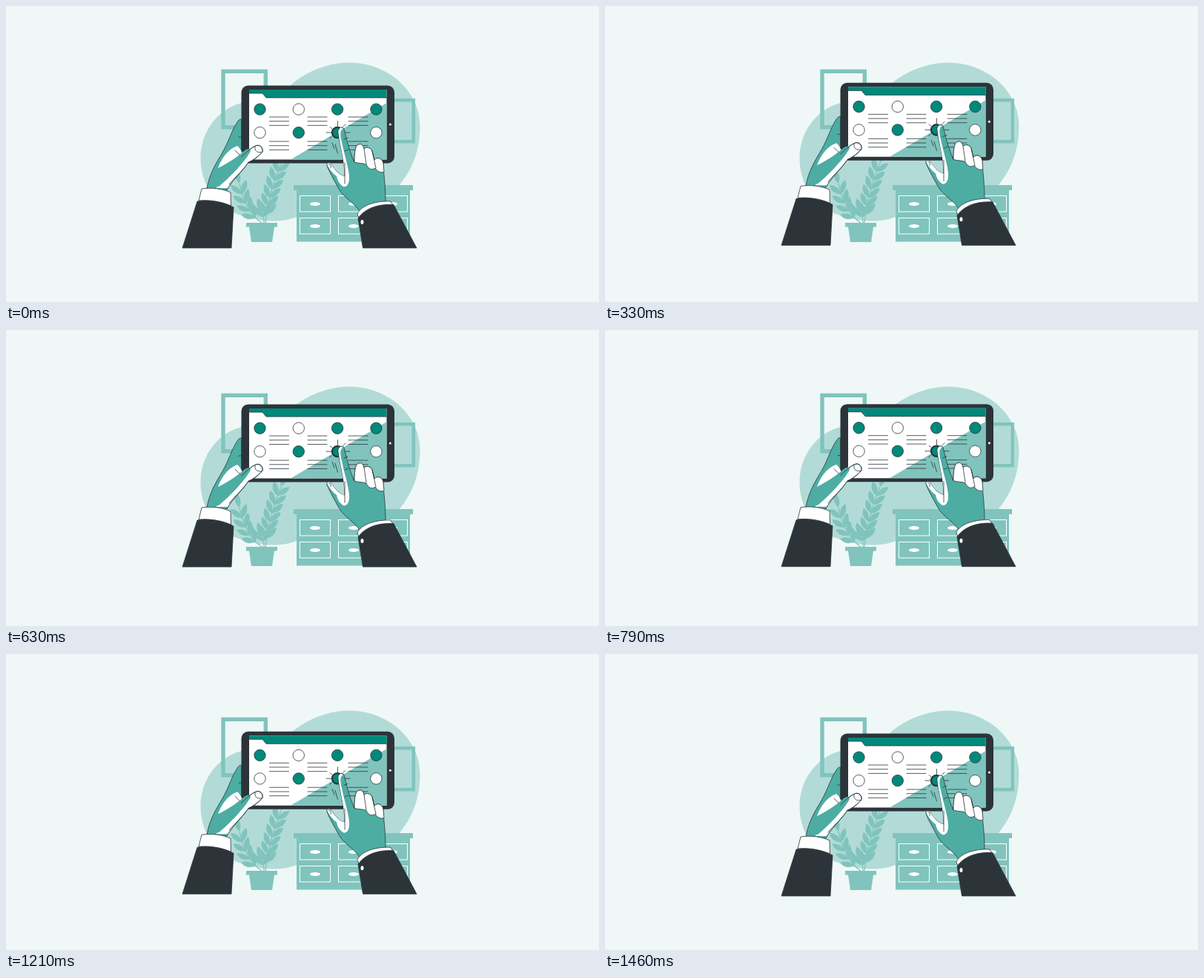
An HTML page that plays this animation: 800x400 px, repeating every 1.5 s.

```html
<!DOCTYPE html>
<html lang="en">
<head>
<meta charset="utf-8">
<title>Tablet in hands</title>
<style>
  html, body { margin: 0; width: 100%; height: 100%; overflow: hidden; background: #eff8f7; }
  svg { display: block; width: 100%; height: 100%; }
  .line { fill: none; stroke: #2c343a; stroke-width: .8; stroke-linecap: round; stroke-linejoin: round; }
  .ink { stroke: #2c343a; stroke-width: .8; stroke-linejoin: round; }
  .dark { fill: #2c343a; }
  .teal { fill: #00897b; }
  .skin { fill: #4dada3; }
  .mid { fill: #80c4bd; }
  .white { fill: #fff; }
  .stem { fill: none; stroke: #80c4bd; stroke-width: 1.3; }
  .drawer { fill: none; stroke: #fff; stroke-width: 1; }
</style>
</head>
<body>
<svg viewBox="0 0 800 400">
  <path fill="#b2dbd7" d="M462 76.5C515 76 558.500 115 558.500 162C558.500 200 545 225 530 243V270L392 285C373 293 345 292 322 284.500C285 275 262.500 243 262.500 206C262.500 165 291 137 318 131C350 124 370 118 384 107C400 92 430 77 462 76.5Z"/>
  <g fill="none" stroke="#80c4bd">
    <rect x="293" y="88.300" width="57.3" height="75.500" stroke-width="5.400"/>
    <rect x="490" y="127.2" width="59.8" height="56" stroke-width="4.5"/>
  </g>
  <g id="plant"><path class="mid" d="M324 293H366V298.5H362L359 319H331L328 298.5H324Z"/></g>
  <g id="desk"><path class="mid" d="M388 242H549V249H545V318.5H392V249H388Z"/></g>

  <g id="front">
    <rect class="dark" x="317.5" y="107.5" width="206.5" height="105" rx="9"/>
    <path class="white" d="M328 113H513.5V207.5H328Z"/>
    <path class="mid" d="M384 207.5L513.5 131V207.5Z"/>
    <path class="teal" d="M328 113H513.5V124H351L346 118H328Z"/>
    <path class="line" d="M328 118H346L351 124H513.5"/>
    <circle class="white" cx="518.4" cy="160" r="1.5"/>
    <g id="screen"></g>
    <circle class="teal" cx="447" cy="171" r="7" stroke="#2c343a" stroke-width="2"/>
    <path class="line" d="M447.5 155.5V163M432 171H439M456 171H464M437 163.5L440 166M455 163L458 160M440 185L443 193M444 187L447.5 199M439 177L436.5 179"/>

    <!-- left arm -->
    <path class="skin ink" d="M271 247C274 228 283 213 292 198C301 182 305 167 312 157C314 153.5 316 152.5 317.5 153V204C325 197 331 191 338 188.5C343 187 347 192 346 197C340 204 333 209 327 211C319 224 306 234 298 249Z"/>
    <path class="white" d="M286 219C290 208 298 194 312 189C316 192 318 197 320 201.5C327 196 332 191 338 189C343 188 346 192 345.5 197C339 204 333 208 327 211C319 222 306 234 299 246L284 246Z"/>
    <path class="skin" d="M272 247C276 232 280 224 286 219C298 213 311 205 321 196C327 191 332 193 329 198C322 210 305 229 287 244Z"/>
    <path class="line" d="M336 190C335 196 339 199 345 197.5M309 195L315 201M314 177H317.5M317.5 204C325 197 331 191 338 188.5C343 187 347 192 346 197C340 204 333 209 327 211C319 224 308 232 301 241"/>
    <path class="white ink" d="M260 263L264 247C277 245 293 247 303 252L303.5 270C290 264 275 262 260 263Z"/>
    <path class="dark ink" d="M258 264C273 261 293 265 307 272L304 327H238Z"/>

    <!-- right arm -->
    <path class="skin ink" d="M448 171C447 164 454 162 456 166C459 178 463 196 470 211C470 200 471 190 474 188C478 185 482 187 483 193C486 190 492 191 494 196L497 208C501 203 508 206 509 213C509 225 512 238 512 267L478 279C472 267 456 260 449 247C443 236 437 226 433 216C432 211 437 210 440 216C446 225 453 230 457 230C457 209 450 187 448 171Z"/>
    <path class="white" d="M433.5 215C433 211 437 211 440 216C446 225 453 230 457 230C457 209 450 187 448.5 171C448 166 452 163 455 166C450 167 451 176 453 184C457 203 462 217 463 230C464 240 459 246 455 244C449 240 447 235 446 230C442 227 437 222 433.5 215Z"/>
    <path class="white ink" d="M470 211C470 200 471 190 474 188C478 185 482 187 483 193C486 190 492 191 494 196L497 208C501 203 508 206 509 213L510 224C506 226 501 224 498 219C494 222 489 221 486 214C481 212 475 213 470 211Z"/>
    <path class="line" d="M483 193L486 213M494 196L499 219M456 180L461 178M457 196L462 193.5M457 212V240M435 213C438 214 439 217 438 219"/>
    <path class="white ink" d="M474 281C479 269 500 263 519 264L522 269C503 268 486 275 477 289Z"/>
    <path class="dark ink" d="M475 287C483 275 499 267 523 268.5L554 327H481.5Z"/>
    <ellipse class="white" cx="480.5" cy="292" rx="2" ry="3"/>
  </g>
</svg>
<script>
const byId = id => document.getElementById(id);

function add(parent, tag, attrs) {
  const node = document.createElementNS(parent.namespaceURI, tag);
  for (const key in attrs) node.setAttribute(key, attrs[key]);
  parent.append(node);
}

// A quadratic stem with paired leaves and one leaf at its tip.
function addStem(x0, y0, x1, y1, x2, y2, pairs) {
  const plant = byId('plant');
  add(plant, 'path', { class: 'stem', d: `M${x0} ${y0}Q${x1} ${y1} ${x2} ${y2}` });
  const leaf = (x, y, angle) => add(plant, 'path', {
    class: 'mid', d: 'M0 0Q11 -8 20 0Q11 7 0 0',
    transform: `translate(${x} ${y}) rotate(${angle})`
  });
  for (let i = 1; i <= pairs; i++) {
    const u = i / pairs, v = 1 - u;
    const x = v * v * x0 + 2 * u * v * x1 + u * u * x2;
    const y = v * v * y0 + 2 * u * v * y1 + u * u * y2;
    const angle = Math.atan2(v * (y1 - y0) + u * (y2 - y1), v * (x1 - x0) + u * (x2 - x1)) * 180 / Math.PI;
    for (const side of i < pairs ? [-34, 34] : [0]) leaf(x, y, angle + side);
  }
}
addStem(345, 293, 323, 278, 315, 240, 5);
addStem(350, 293, 354, 255, 371, 212, 7);
addStem(348, 293, 348, 285, 346, 279, 2);

for (const x of [396, 448, 500]) {
  for (const y of [256.5, 286.5]) {
    add(byId('desk'), 'rect', { class: 'drawer', x: x + .5, y, width: 41, height: 21.5 });
    add(byId('desk'), 'ellipse', { class: 'white', cx: x + 21, cy: y + 11, rx: 7, ry: 2.6 });
  }
}

const screen = byId('screen');
['TWTT', 'WTTW'].forEach((row, r) => [...row].forEach((kind, c) => {
  add(screen, 'circle', {
    class: kind === 'T' ? 'teal ink' : 'white ink',
    cx: 342.5 + c * 52.3, cy: 139.6 + r * 31.5, r: 7.7
  });
}));
for (const x of [355.5, 407, 462])
  for (const y of [150, 183])
    for (let i = 0; i < 3; i++)
      add(screen, 'path', { class: 'line', d: `M${x} ${y + i * 5.7}h26` });

const LOOP = 1500, HALF = 730, RISE = 8;
function draw() {
  const t = performance.now() % LOOP;
  const lift = RISE * Math.max(0, 1 - Math.abs(t / HALF - 1));
  byId('front').setAttribute('transform', `translate(0 ${-lift})`);
  requestAnimationFrame(draw);
}
draw();
</script>
</body>
</html>
```
